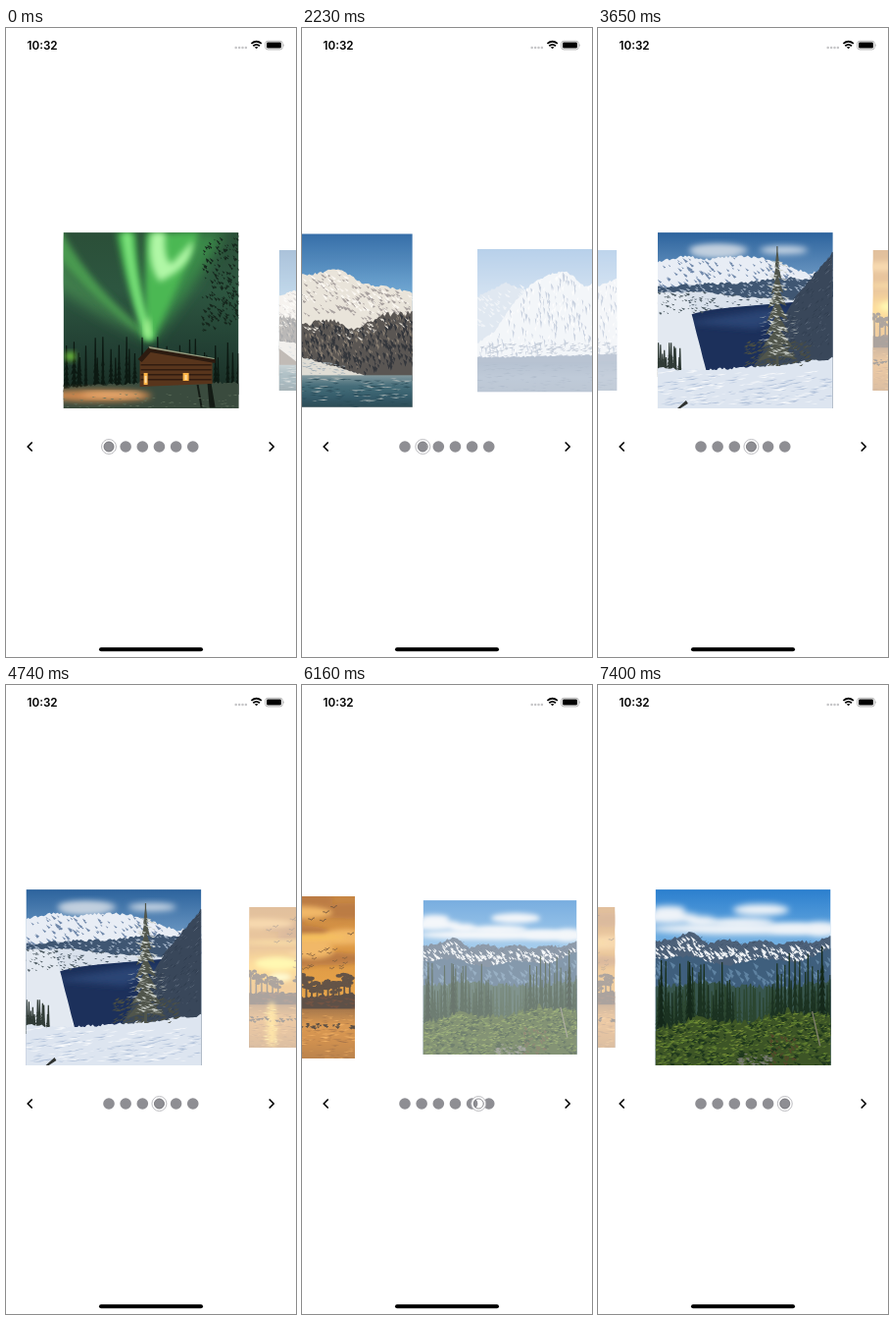
Animation, 296 px wide and 640 px high, one loop 7790 ms. Source, as an HTML page:

```html
<!DOCTYPE html>
<html lang="en">
<head>
<meta charset="utf-8">
<title>Carousel</title>
<style>
html, body { margin: 0; width: 100%; height: 100%; overflow: hidden; background: #fff; }
#stage { display: block; width: 296px; height: 640px; }
text { font: 600 11.7px Inter, "Liberation Sans", sans-serif; }
</style>
</head>
<body>
<svg id="stage" viewBox="0 0 296 640">
  <defs>
    <filter id="soft" x="-50%" y="-50%" width="200%" height="200%"><feGaussianBlur stdDeviation="3"/></filter>
    <filter id="glow" x="-50%" y="-50%" width="200%" height="200%"><feGaussianBlur stdDeviation="7"/></filter>
  </defs>
  <rect width="296" height="640" fill="#fff"/>
  <g id="cards"></g>
  <text x="21.5" y="21.7">10:32</text>
  <g fill="#c5c5c7" id="signal"></g>
  <g fill="none" stroke="#000" stroke-width="1.8">
    <path d="M250.4 15.9q5.2-4.2 10.4 0M252.3 18.2q3.3-2.6 6.6 0"/>
    <path d="M254.4 19.6h2.4l-1.2 1.3z" fill="#000" stroke-width=".8"/>
  </g>
  <rect x="264.7" y="13.3" width="17.6" height="8.6" rx="2.5" fill="none" stroke="#aaa" stroke-width=".9"/>
  <rect x="266" y="14.6" width="15" height="6" rx="1.4"/>
  <path d="M283.4 16v3.2q1.5-1.6 0-3.2" fill="#aaa"/>
  <path d="M26.2 422l-4 4 4 4M269.2 422l4 4-4 4" fill="none" stroke="#000" stroke-width="1.7" stroke-linecap="round" stroke-linejoin="round"/>
  <g id="dots" fill="#8e8e93"></g>
  <g id="ring" fill="none">
    <circle r="6.3" stroke="#fff" stroke-width="2.2"/>
    <circle r="7.5" stroke="#bdbdc1" stroke-width="1"/>
    <circle r="5" stroke="#77777c" stroke-width=".8"/>
  </g>
  <rect x="95" y="630.2" width="106" height="4" rx="2"/>
</svg>
<script>
const LOOP = 7790, SIZE = 178.8, SPACING = 252.7, CX = 148, CY = 297.5;
const $ = id => document.getElementById(id);

let seed = 7;
const rand = (a = 0, b = 1) => {
  seed = (seed * 16807) % 2147483647;
  return a + (b - a) * seed / 2147483647;
};
const repeat = (n, fn) => Array.from({ length: n }, (_, i) => fn(i)).join('');
const path = (fill, d, extra = '') => `<path fill="${fill}" d="${d}" ${extra}/>`;
const oval = (fill, x, y, rx, ry, extra = '') =>
  `<ellipse cx="${x}" cy="${y}" rx="${rx}" ry="${ry}" fill="${fill}" ${extra}/>`;
const SOFT = 'filter="url(#soft)"', GLOW = 'filter="url(#glow)"';

let gradients = 0;
// Vertical gradient from y to the bottom of the card
function fade(y, ...colors) {
  const id = 'fade' + gradients++;
  const stops = colors.map((c, i) => `<stop offset="${i / (colors.length - 1)}" stop-color="${c}"/>`).join('');
  return `<linearGradient id="${id}" x2="0" y2="1">${stops}</linearGradient>`
    + `<rect y="${y}" width="179" height="${179 - y}" fill="url(#${id})"/>`;
}
// Height of a skyline given by evenly spaced key heights
function heightAt(line, x) {
  const u = Math.max(0, Math.min(.999, x / 179)) * (line.length - 1), i = Math.floor(u);
  return line.length < 2 ? line[0] : line[i] + (line[i + 1] - line[i]) * (u - i);
}
const land = (fill, line, rough = 3, bottom = 179) => path(fill,
  `M0 ${bottom}` + repeat(91, i => `L${i * 2} ${heightAt(line, i * 2) + rand(-rough, rough) / 2}`) + `V${bottom}z`);
// Small slanted strokes scattered below a skyline
const flecks = (fill, n, line, depth, w = 6, h = 1.5, slant = 0, x0 = 0, x1 = 179) => path(fill, repeat(n, () => {
  const x = rand(x0, x1), y = heightAt(line, x) + rand(0, depth), k = rand(.4, 1);
  return `M${x - w * k / 2} ${y}l${w * k} ${slant * w * k}l${-w * k * .4} ${h * k}z`;
}));
const clouds = (fill, n, y0, y1, size) => `<g ${SOFT}>` + repeat(n, () =>
  oval(fill, rand(0, 179), rand(y0, y1), rand(.5, 1.2) * size, rand(.12, .25) * size)) + '</g>';
const fir = (x, top, base, w) => repeat(8, i => {
  const y = top + (base - top) * i / 9, r = w * (i + 1) / 9 * rand(.7, 1.1), h = (base - top) / 6;
  return `M${x} ${y}l${r} ${h}l${-r} ${-h * .2}l${-r} ${h * .3}z`;
}) + `M${x - .6} ${top}h1.2l1 ${base - top}h-3z`;
const firs = (fill, n, x0, x1, top0, top1, base, w) => path(fill, repeat(n, i =>
  fir(x0 + (x1 - x0) * (i + rand()) / n, rand(top0, top1), base, w * rand(.7, 1.2))));
const birds = (n, x0, y0, y1, s) => repeat(n, () =>
  `M${rand(x0, 174)} ${rand(y0, y1)}q${s / 2} ${rand(-1, 0)} ${s} ${s * .35}q${s * .3} ${-s * .7} ${s * .8} ${-s * .6}`);

const ray = (fill, x, w, blur) => path(fill, `M${x} 0h${w}Q${(x + w) * .6 + 32} 60 92 108h-8Q${x * .6 + 32} 60 ${x} 0z`, blur);
const aurora = () => fade(0, '#2b4f38', '#2d5640', '#223f33', '#162720')
  + ray('#43824d', -75, 50, GLOW) + ray('#4a9a50', -25, 24, SOFT) + ray('#3a8b48', 120, 45, GLOW)
  + ray('#42ad4e', 54, 20, SOFT) + ray('#4bb853', 84, 55, SOFT) + ray('#83e981', 60, 9, SOFT)
  + path('#b0f7a6', 'M90 0h14q-2 26 6 32Q120 22 132 8Q134 34 98 50Q84 30 90 0z', SOFT)
  + oval('#b2f799', 86, 98, 2.5, 11, SOFT)
  + flecks('#15261c', 240, [45, 0], 90, 4, 2, .6, 142, 181)
  + firs('#0c1912', 32, 0, 179, 106, 128, 165, 5)
  + oval('#83e03c', 7, 126, 5, 4, SOFT)
  + land('#3a4b3e', [158, 152, 153])
  + oval('#d18a50', 35, 166, 55, 6, SOFT) + oval('#f2b579', 50, 165, 32, 2.5, SOFT)
  + path('#58351c', 'M78 130L88 119L152 131V154L78 157z')
  + path('#2c1b10', 'M76 129L88 116L155 129v4L89 122L80 132z')
  + path('#99a284', 'M87 116l67 12v1L88 118z')
  + path('#311c10', repeat(4, i => `M79 ${134 + i * 5}h72v1.3h-72z`))
  + path('#ffb344', 'M82 143h4v12h-4zM122 143h6v8h-6z') + path('#ffdca0', 'M83 146h2v7h-2zM124 145h2v5h-2z')
  + path('#141b15', 'M147 154h4l4 24h-6zM136 155h2l4 23h-2z')
  + flecks('#61735e', 70, [164], 15, 5, 1);

const glacier = () => {
  const snow = [57, 51, 44, 42, 36, 52, 55, 61], rock = [84, 88, 96, 88, 99, 83, 82];
  return fade(0, '#2f69a5', '#6aa3d0', '#9cc4e0', '#9cc4e0')
    + land('#e9e3d9', snow) + flecks('#a39c9a', 260, snow, 42, 6, 1.6, .5) + flecks('#fbf8f2', 150, snow, 28, 6, 1.5, .6)
    + land('#54504d', rock, 6) + flecks('#e3ded5', 90, rock, 12, 6, 1.5, .4)
    + flecks('#857a6d', 240, rock, 40, 3, 4, .9) + flecks('#2b2e34', 420, rock, 52, 4, 5, .8)
    + land('#dfdcd4', [115, 122, 134, 148, 152], 2) + flecks('#9dabb4', 110, [119, 126, 136, 148], 18, 6, 1, .1, 0, 112)
    + path('#66564b', 'M0 125L30 148L0 160z')
    + fade(146, '#7d949a', '#3f6875', '#2e5766', '#23434e')
    + flecks('#b4bab8', 90, [148], 26, 12, 1) + flecks('#1f414e', 110, [150], 28, 11, 1);
};

const peak = () => {
  const line = [118, 102, 68, 45, 32, 28, 46, 46, 36];
  return fade(0, '#5e96d1', '#9fc0e2', '#cfdceb', '#cfdceb')
    + land('#b9cbe0', [60, 42, 58, 50, 80, 90]) + flecks('#dfe7f0', 80, [60, 42, 58, 50], 40, 8, 2, .6, 0, 90)
    + land('#e6ebf2', line) + flecks('#8398b8', 230, line, 88, 3, 9, 1.3) + flecks('#fafbfc', 160, line, 80, 3, 8, -1.2)
    + flecks('#7f92ad', 170, [118], 20, 9, 3, -.2)
    + land('#60789a', [136, 134, 132], 2)
    + fade(142, '#5a7699', '#7088a8', '#68819f') + flecks('#4f6b8e', 130, [144], 34, 11, 1);
};

const snowLake = () => {
  const top = [30, 24, 27, 24, 25, 32, 42, 36], slope = [180, 180, 180, 120, 62, 20], bank = [60, 59, 68, 110, 180];
  return fade(0, '#2c639d', '#7fa7cd', '#8cb0d1', '#8cb0d1') + clouds('#c8d6e4', 2, 15, 20, 28)
    + oval('#c2d0df', 62, 18, 30, 6, SOFT)
    + land('#e8edf5', top) + flecks('#7189ab', 150, top, 26, 6, 1.6, .6)
    + land('#3f5672', [56, 52, 51, 46, 50]) + flecks('#aebed2', 130, [56, 52, 51, 46, 50], 15, 5, 1.4, .3)
    + land('#d9e1ec', [61, 60, 66, 68, 66], 2) + flecks('#4a5a68', 130, [63, 61, 66, 68], 16, 5, 1.6)
    + path('#1c305b', 'M18 92Q30 80 78 76L150 70L125 140H47Q20 138 18 92z')
    + path('#2a4474', 'M26 92L107 79L140 79L100 98z', SOFT)
    + land('#39475a', slope) + flecks('#c3cedd', 130, slope, 85, 5, 2, -.9, 120) + flecks('#1f2c3c', 160, slope, 100, 5, 2.5, -1, 125)
    + land('#e3e9f1', [61, 64, 180, 180, 180, 180, 180], 1) + flecks('#4b5960', 55, bank, 22, 5, 1.5, .3, 0, 60)
    + firs('#303b36', 12, 0, 24, 112, 127, 147, 4)
    + land('#dde5f0', [138, 140, 137, 133, 128])
    + flecks('#aebfd8', 110, [146], 30, 15, 2, -.15) + flecks('#fff', 90, [140], 35, 14, 1.5, -.1)
    + flecks('#4a4e43', 200, [112], 24, 6, 3, -.5, 90, 156)
    + path('#50554b', fir(122, 14, 136, 22))
    + flecks('#c9cec9', 90, [28], 95, 8, 1.2, .25, 114, 132) + flecks('#c9cec9', 60, [80], 48, 9, 1.3, -.2, 104, 143)
    + path('#303331', 'M20 179l9-8 2 3-8 5z');
};

const pine = (x, top, r) => path('#33200e', `M${x - .7} ${top}h1.4l.5 ${118 - top}h-2.4z`)
  + repeat(8, () => oval('#362111', x + rand(-r, r), top + rand(0, 12), r * .5, 2));
const sunset = () => fade(0, '#b6630d', '#d47b0e', '#e28c16', '#d76c09')
  + clouds('#a7550b', 8, 0, 70, 50) + clouds('#eda33a', 6, 10, 70, 40)
  + oval('#f8b52a', 80, 45, 90, 3, SOFT)
  + oval('#ffb109', 36, 77, 60, 15, GLOW)
  + oval('#ffef42', 36, 72, 28, 8, SOFT) + oval('#fff995', 40, 89, 14, 5, SOFT)
  + path('none', birds(20, 7, 8, 47, 4), 'stroke="#4c2807"')
  + path('none', birds(40, 55, 56, 80, 3), 'stroke="#633307" stroke-width=".9"')
  + repeat(6, i => pine(2 + i * 7, 81 + i * 2, 6)) + pine(65, 88, 7) + pine(88, 94, 9)
  + repeat(10, i => pine(119 + i * 6, rand(84, 96), 7))
  + land('#2f1c10', [109, 109, 111, 107]) + flecks('#49210c', 70, [108], 15, 9, 3)
  + fade(124, '#8c4f16', '#d27d20', '#c16f1b', '#a75f18')
  + oval('#ffc12c', 29, 150, 6, 30, SOFT)
  + flecks('#ee9a37', 160, [127], 52, 12, 1) + flecks('#8e4d14', 170, [128], 51, 11, 1)
  + flecks('#ffd44a', 50, [127], 51, 8, 1, 0, 20, 36) + flecks('#2b1b0e', 90, [139], 6, 6, 3);

const forest = () => {
  const ridge = [53, 50, 42, 55, 50, 56, 51, 56, 52, 54, 48], bushes = [142, 130, 136, 124, 128];
  return fade(0, '#2b7fce', '#78b4e4', '#cfe0ee', '#cfe0ee')
    + clouds('#eef3f8', 8, 10, 42, 30) + oval('#eef3f8', 90, 40, 95, 6, SOFT)
    + land('#4d6179', ridge) + flecks('#f1f4f7', 230, ridge.map(y => y + 3), 16, 6, 1.8, .7) + flecks('#2f435b', 150, ridge, 18, 5, 1.8, -.6)
    + land('#3f5f7d', [70, 68, 78, 70, 75, 60]) + flecks('#5f83a2', 110, [72, 70, 80, 72, 76, 64], 26, 6, 4, .6)
    + land('#38564e', [101, 94, 98, 100, 92], 6)
    + firs('#2b4630', 55, 0, 179, 94, 114, 143, 4)
    + firs('#1b3221', 22, 0, 82, 72, 108, 145, 5) + firs('#1b3221', 18, 118, 179, 64, 106, 149, 5)
    + path('#14281a', fir(170, 58, 128, 6) + fir(6, 72, 142, 6) + fir(35, 74, 137, 6))
    + land('#3d5526', bushes, 9)
    + flecks('#1f371d', 330, bushes, 55, 7, 3.5, .2) + flecks('#607f2f', 420, bushes, 48, 7, 2.5, -.25)
    + flecks('#8ba03c', 170, bushes, 38, 6, 1.5, -.2)
    + flecks('#74776d', 35, [165], 12, 7, 2.5, 0, 84, 118) + flecks('#54482a', 40, [146], 30, 5, 2.5, .5, 117, 145)
    + path('none', 'M160 124q4 18 8 35', 'stroke="#82806f" stroke-width="1.3"');
};

$('cards').innerHTML = [aurora, glacier, peak, snowLake, sunset, forest]
  .map(scene => `<g><svg width="${SIZE}" height="${SIZE}">${scene()}</svg></g>`).join('');
$('signal').innerHTML = repeat(4, i => `<circle cx="${234.7 + i * 3.4}" cy="20" r="1.25"/>`);
$('dots').innerHTML = repeat(6, i => `<circle cx="${105 + i * 17.15}" cy="426" r="5.8"/>`);
const cards = [...$('cards').children];

const swipes = [
  { start: 830, tau: 445, focusAt: 1206 },
  { start: 1900, tau: 366, focusAt: 2126 },
  { start: 2770, tau: 323, focusAt: 3020 },
  { start: 4630, tau: 279, focusAt: 4850 },
  { start: 5650, tau: 403, focusAt: 5981 },
];
const FIRST = 870, STEP = 110;

const hold = t => t < FIRST ? 0 : FIRST + Math.floor((t - FIRST) / STEP) * STEP;
const settle = u => u <= 0 ? 0 : 1 - Math.exp(-Math.pow(u, 1.6));
const smooth = u => { u = Math.max(0, Math.min(1, u)); return u * u * (3 - 2 * u); };

function draw(t) {
  const time = hold(t);
  let scroll = 0, focus = 0;
  for (const { start, tau, focusAt } of swipes) {
    scroll += settle((time - start) / tau);
    focus += smooth((time - focusAt) / 400);
  }
  cards.forEach((card, i) => {
    const near = Math.max(0, 1 - Math.abs(i - focus));
    const scale = .8 + .2 * near, x = CX + (i - scroll) * SPACING * scale;
    const half = SIZE / 2 * scale;
    card.style.display = x + half < 0 || x - half > 296 ? 'none' : '';
    card.setAttribute('transform', `translate(${x - half} ${CY - half}) scale(${scale})`);
    card.setAttribute('opacity', .4 + .6 * near);
  });
  $('ring').setAttribute('transform', `translate(${105 + 17.15 * focus} 426)`);
}

const origin = performance.now();
function tick() {
  draw((performance.now() - origin) % LOOP);
  requestAnimationFrame(tick);
}
tick();
</script>
</body>
</html>
```
